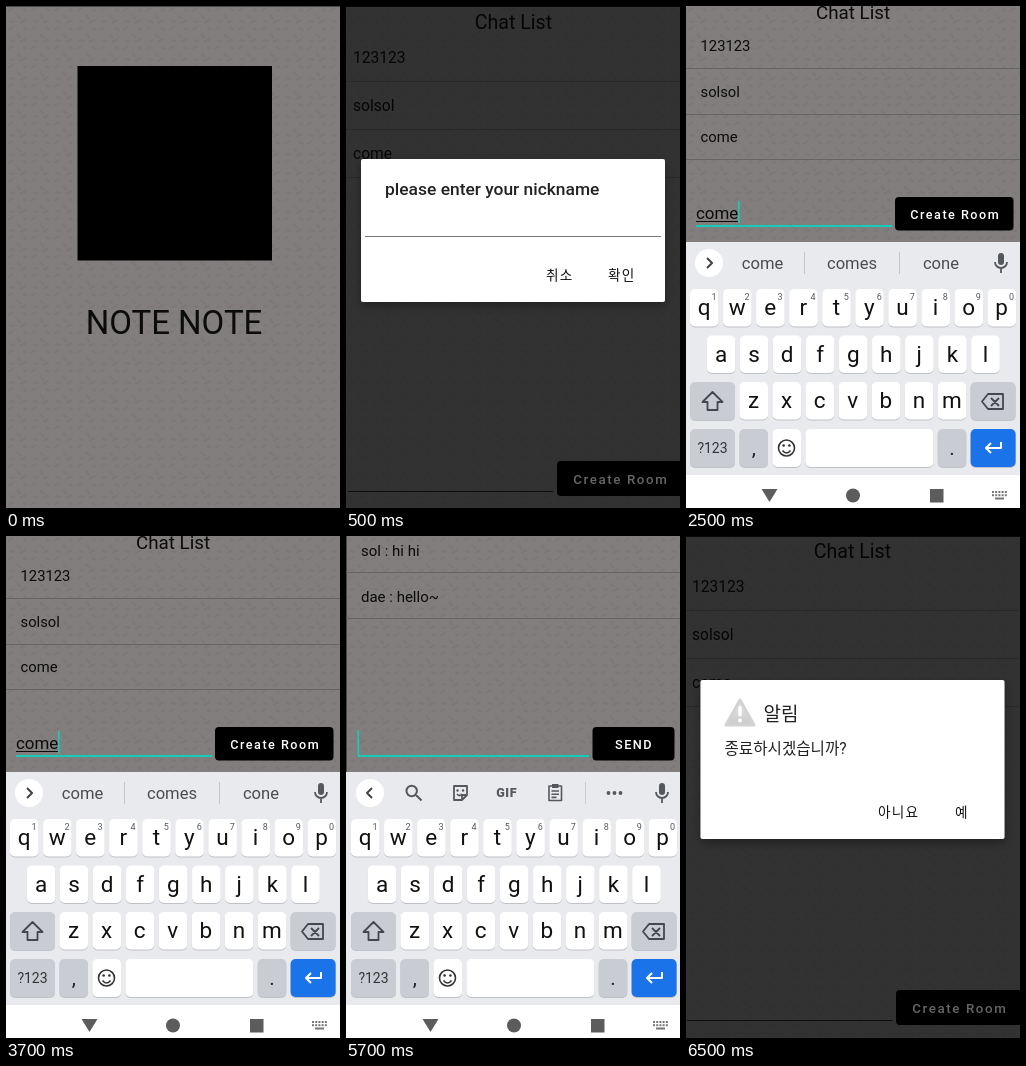
Animation of 334x502 px, one loop 8000 ms. Source, as an HTML page:

```html
<!DOCTYPE html>
<html lang="ko">
<head>
<meta charset="utf-8">
<title>Chat app tour</title>
<style>
html, body { margin: 0; width: 100%; height: 100%; overflow: hidden; background: #817e7d; }
svg { display: block; width: 100vw; height: 100vh; }
text { font-family: Roboto, "Noto Sans CJK KR", "Noto Sans CJK", sans-serif; white-space: pre; }
.scene { opacity: 0; }
</style>
</head>
<body>
<svg id="stage" viewBox="0 0 334 502" preserveAspectRatio="none">
  <defs>
    <pattern id="paper" width="23" height="19" patternUnits="userSpaceOnUse">
      <rect width="23" height="19" fill="#817e7d"/>
      <path d="M2 5l5-3M11 9l4 4M17 3l4 2M4 15l5 1M14 17l6-3" stroke="#7b7877" stroke-width="2"/>
    </pattern>
    <linearGradient id="warn" x2="0" y2="1">
      <stop offset="0" stop-color="#e6e6e6"/>
      <stop offset="1" stop-color="#cbcbcb"/>
    </linearGradient>
    <filter id="lift" x="-10%" y="-10%" width="120%" height="130%">
      <feDropShadow dx="0" dy="4" stdDeviation="5" flood-opacity=".35"/>
    </filter>
  </defs>
</svg>
<script>
const LOOP = 8000;
const ICON = '#55585c';

const attrs = o => Object.entries(o).map(([k, v]) => ` ${k}="${v}"`).join('');
const rect = (x, y, w, h, fill, o = {}) =>
  `<rect${attrs({ x, y, width: w, height: h, fill, ...o })}/>`;
const text = (s, x, y, size, o = {}) =>
  `<text${attrs({ x, y, 'font-size': size, fill: '#0b0b0b', ...o })}>${s}</text>`;
const mid = (s, x, y, size, o = {}) => text(s, x, y, size, { 'text-anchor': 'middle', ...o });
const circle = (cx, cy, r, fill) => `<circle${attrs({ cx, cy, r, fill })}/>`;
const stroke = (d, color = ICON, w = 1.8) =>
  `<path${attrs({ d, fill: 'none', stroke: color, 'stroke-width': w, 'stroke-linejoin': 'round' })}/>`;
const fill = (d, color = ICON) => `<path${attrs({ d, fill: color })}/>`;
const shift = (x, y, s) => `<g transform="translate(${x} ${y})">${s}</g>`;

const wall = () => rect(0, 0, 334, 502, 'url(#paper)');
const rule = y => rect(0, y, 334, 1, '#666362');
const button = (s, x, y, w, h, tx, ty, size, ls) =>
  rect(x, y, w, h, '#000', { rx: 4 }) +
  text(s, tx, ty, size, { fill: '#fff', 'font-weight': 500, 'letter-spacing': ls });

function key(x, y, w, color, h = 38) {
  return rect(x, y + 1, w, h, '#bfc2c8', { rx: 5 }) + rect(x, y, w, h, color, { rx: 5 });
}

function letters(row, x, y, hints) {
  return [...row].map((c, i) => {
    const kx = x + i * 33.05;
    return key(kx, y, 28.6, '#fff', 37.5) +
      mid(c, kx + 14.2, y + 26, 22.5, { fill: '#111' }) +
      (hints ? mid((i + 1) % 10, kx + 24, y + 10.5, 9, { fill: '#55585c' }) : '');
  }).join('');
}

function mic(x) {
  return rect(x - 3, 247, 6, 12, ICON, { rx: 3 }) +
    stroke(`M${x - 6} 256a6 6 0 0 0 12 0M${x} 262v5`);
}

function keyboard(dx, toolbar) {
  const grey = '#c9ccd3';
  let s = letters('qwertyuiop', 4, 283, true) + letters('asdfghjkl', 20.8, 329.5) +
    letters('zxcvbnm', 53.4, 376);
  s += key(4, 376, 45, grey) + key(284.6, 376, 45, grey);
  s += stroke('M26.500 386l-10 10h5v8h10v-8h5z', '#44474b');
  s += stroke('M302 388h15v15h-15l-6-7.500zM305 392l8 8M313 392l-8 8', '#44474b');
  s += key(4, 423, 45, grey) + mid('?123', 26.5, 447, 14, { fill: '#333' });
  s += key(53.4, 423, 28.6, grey) + mid(',', 67.7, 449, 21, { fill: '#222' });
  s += key(86.4, 423, 28.6, '#fff') + key(119.4, 423, 128, '#fff');
  s += stroke('M92.500 442a8 8 0 1 0 16 0a8 8 0 1 0-16 0M96.500 444.500q4 5 8 0', '#333', 1.6) +
    circle(97.6, 439.5, 1.3, '#333') + circle(103.4, 439.5, 1.3, '#333');
  s += key(251.7, 423, 28.6, grey) + mid('.', 266, 449, 21, { fill: '#222' });
  s += key(284.6, 423, 45, '#1a73e8') +
    stroke('M315 436v6h-15M305 437l-5 5l5 5', '#fff', 2);
  s += fill('M75.500 483h16l-8 13z', '#5c5c5c') + circle(167, 489.5, 7, '#5c5c5c') +
    rect(244, 483, 13.5, 13.5, '#5c5c5c');
  for (let i = 0; i < 5; i++)
    for (let j = 0; j < 2; j++) s += rect(306 + i * 3.2, 485 + j * 3.2, 2, 2, '#777');
  s += rect(309, 491.5, 9, 2, '#777');
  return rect(0, 236, 334, 233, '#e9eaee') + rect(0, 469, 334, 33, '#fff') +
    shift(dx, 0, s + toolbar + mic(315));
}

function suggestions() {
  return circle(23, 257, 14, '#fff') + stroke('M21 252l5 5l-5 5', '#444', 2) +
    [['come', 76.5], ['comes', 166], ['cone', 255]]
      .map(([w, x]) => mid(w, x, 263, 16.6, { fill: '#4a4c50' })).join('') +
    rect(118, 246, 1, 22, '#c4c6ca') + rect(213, 246, 1, 22, '#c4c6ca');
}

function tools() {
  return circle(23, 257, 14, '#fff') + stroke('M25 252l-5 5l5 5', '#444', 2) +
    stroke('M59.500 255a5.200 5.200 0 1 0 10.400 0a5.200 5.200 0 1 0-10.400 0M68.500 258.500l6 6', ICON, 2) +
    stroke('M107 250h13v9l-5 5h-8zM115 264v-5h5M110 258q2.500 3 5 0') +
    circle(110.5, 254.5, 1.2, ICON) + circle(116, 254.5, 1.2, ICON) +
    mid('GIF', 159.7, 261.2, 12.5, { fill: ICON, 'font-weight': 900, 'letter-spacing': .6 }) +
    stroke('M202 250h12.500v14.500h-12.500zM204.500 255h7.500M204.500 258.200h7.500M204.500 261.400h5', ICON, 1.6) +
    rect(205, 248, 6.5, 4, ICON) + rect(238, 246, 1, 22, '#c9cbcf') +
    [261.5, 267.5, 273.5].map(x => circle(x, 257, 1.9, ICON)).join('');
}

function dimList(dx, dy) {
  const rows = ['123123', 'solsol', 'come'].map((s, i) =>
    text(s, 7, 57 + i * 48, 15.6) + rule(75 + i * 48)).join('');
  return wall() + shift(dx, dy, mid('Chat List', 167.5, 23, 19.6) + rows +
    rect(2, 485, 205.5, 1, '#222') +
    button('Create Room', 211, 455, 126, 35, 227.3, 478, 13.3, 1.6)) +
    rect(0, 0, 334, 502, '#000', { 'fill-opacity': .6 }) + rect(0, 0, 334, 1, '#080808');
}

const dialog = (x, y, w, h) => rect(x, y, w, h, '#fff', { rx: 2, filter: 'url(#lift)' });
const choice = (s, x, y) =>
  text(s, x, y, 13.6, { 'font-weight': 500, 'letter-spacing': 1.2, fill: '#111' });

const splash = () => wall() + rect(0, 0, 334, 1, '#4a4847') +
  rect(71.5, 60, 194.5, 194.5, '#000') + mid('NOTE NOTE', 168, 328, 33);

const nickname = () => dimList(0, 0) + dialog(15, 153, 304, 143) +
  text('please enter your nickname', 39, 189, 17.4, { 'font-weight': 500, fill: '#222' }) +
  rect(19, 230, 296, 1, '#777') + choice('취소', 200, 274) + choice('확인', 262, 274);

const newRoom = () => wall() + mid('Chat List', 167, 13, 18.8) +
  ['123123', 'solsol', 'come'].map((s, i) =>
    text(s, 14.5, 45 + i * 45.6, 14.8) + rule(Math.round(62 + i * 45.6))).join('') +
  text('come', 10, 213, 16.9) + rect(10, 215, 42, 1, '#0b0b0b') +
  rect(52, 195, 1.6, 22, '#14cdb9') + rect(10, 219, 196, 2, '#14cdb9') +
  button('Create Room', 209, 191, 118.5, 33.5, 224.3, 212.5, 12.6, 1.5) +
  keyboard(0, suggestions());

const chat = () => wall() + rect(0, 0, 1, 236, '#4a4847') +
  text('sol : hi hi', 15, 20, 15) + rule(36) +
  text('dae : hello~', 15, 66, 15) + rule(82) +
  rect(11.5, 194, 1.6, 26, '#14cdb9') + rect(12, 219, 231, 2, '#14cdb9') +
  button('SEND', 246.5, 191, 82, 33.5, 269, 212.8, 12.7, 1.5) +
  keyboard(1, tools());

const quit = () => dimList(-1, -1) + dialog(14.5, 144, 304, 159) +
  `<path d="M54 164L68 189H40Z" fill="url(#warn)" stroke="#d2d2d2" stroke-width="3" stroke-linejoin="round"/>` +
  rect(52.3, 170, 3.4, 10.5, '#fff', { rx: 1.5 }) + circle(54, 184.5, 2, '#fff') +
  text('알림', 77.5, 185, 19, { fill: '#222' }) +
  text('종료하시겠습니까?', 38.5, 218, 15.6, { fill: '#222' }) +
  choice('아니요', 192, 281) + choice('예', 269, 281);

const steps = [[0, splash], [500, nickname], [2500, newRoom], [4500, chat], [6500, quit]];

const stage = document.getElementById('stage');
const layers = steps.map(([, draw]) => {
  const g = document.createElementNS('http://www.w3.org/2000/svg', 'g');
  g.setAttribute('class', 'scene');
  g.innerHTML = draw();
  stage.append(g);
  return g;
});

let shown = -1;
function tick() {
  const t = performance.now() % LOOP;
  const now = steps.findLastIndex(([start]) => t >= start);
  if (now !== shown) {
    layers.forEach((g, i) => { g.style.opacity = i === now ? 1 : 0; });
    shown = now;
  }
  requestAnimationFrame(tick);
}
tick();
</script>
</body>
</html>
```
